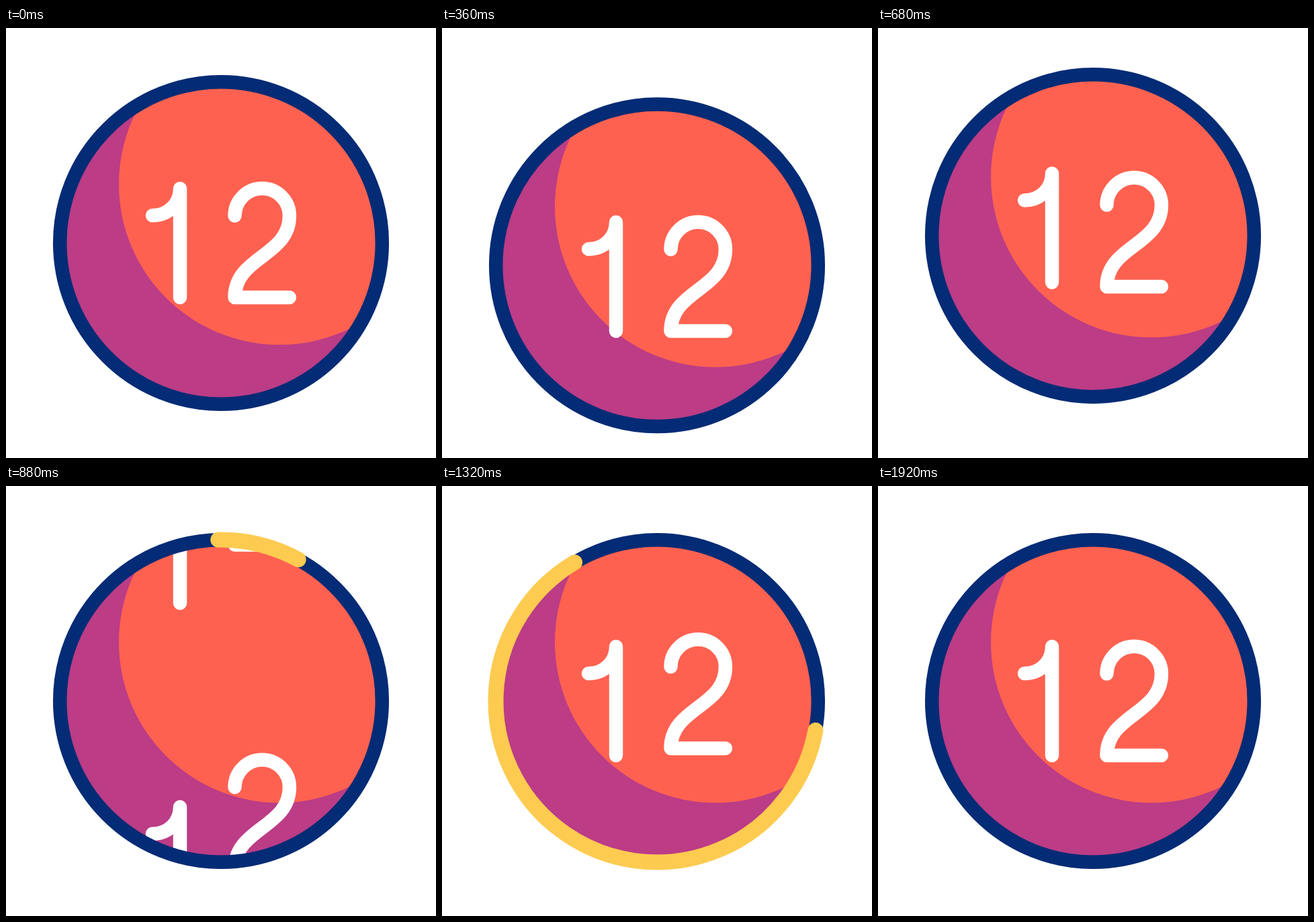
Write an HTML page that moves like this. It is 640x640 px and loops after 2 s.

```html
<!DOCTYPE html>
<html lang="en">
<head>
<meta charset="utf-8">
<title>Number ball</title>
<style>
  html, body { margin: 0; width: 100%; height: 100%; overflow: hidden; background: #fff; }
  svg { display: block; width: 100%; height: 100%; }
  .line { fill: none; stroke-linecap: round; stroke-linejoin: round; }
  .digit { stroke: #fff; stroke-width: 20.5; }
</style>
</head>
<body>
<svg viewBox="0 0 640 640">
  <defs>
    <clipPath id="inside"><circle cx="320" cy="320" r="238"/></clipPath>
    <path id="one" class="line digit" d="M259 401V239C259 262 241 279 218 279"/>
    <path id="two" class="line digit" d="M340.5 279.5a40.7 40.7 0 0 1 81.4 0C421.9 340 340.5 340 340.5 401H421.9"/>
  </defs>
  <g id="ball">
    <g clip-path="url(#inside)">
      <circle cx="320" cy="320" r="240" fill="#bc3c86"/>
      <circle cx="407" cy="232.5" r="239" fill="#ff6150"/>
      <use id="oldOne" href="#one"/>
      <use id="oldTwo" href="#two"/>
      <use id="newOne" href="#one"/>
      <use id="newTwo" href="#two"/>
    </g>
    <circle class="line" cx="320" cy="320" r="239.8" stroke="#042b75" stroke-width="20.5"/>
  </g>
  <path id="arc" class="line" stroke="#fdcb50" stroke-width="23"/>
</svg>
<script>
const LOOP = 2000, STEP = 40;
const $ = id => document.getElementById(id);

// Each track lists [time, value] keys, eased in and out between neighbours.
// Digits move relative to the ball that carries them.
const hop = [[120, 0], [360, 16.7], [560, -33]];
const shifts = {
  ball: [[120, 0], [360, 33.3], [560, -31], [760, 0]],
  oldOne: [...hop, [760, 0], [960, -350]],
  oldTwo: [...hop, [720, 0], [920, -350]],
  newOne: [[760, 313], [1160, -30.5], [1320, 0]],
  newTwo: [[720, 325], [1120, -119], [1365, 0]]
};
const head = [[760, 0], [1440, 360]];
const tail = [[1040, 0], [1840, 360]];

function valueAt(keys, t) {
  const next = keys.findIndex(key => key[0] > t);
  if (next < 0) return keys[keys.length - 1][1];
  if (next === 0) return keys[0][1];
  const [t0, v0] = keys[next - 1], [t1, v1] = keys[next];
  const p = (t - t0) / (t1 - t0);
  return v0 + (v1 - v0) * p * p * (3 - 2 * p);
}

function pointAt(degrees) {
  const a = (degrees - 1) * Math.PI / 180;
  return `${320 + 240 * Math.sin(a)} ${320 - 240 * Math.cos(a)}`;
}

function arcPath(from, to) {
  if (to <= from) return '';
  const curve = end => `A240 240 0 0 1 ${pointAt(end)}`;
  return `M${pointAt(from)}${curve((from + to) / 2)}${curve(to)}`;
}

function draw(now) {
  const t = Math.floor(now % LOOP / STEP) * STEP;
  for (const id in shifts) {
    $(id).setAttribute('transform', `translate(0 ${valueAt(shifts[id], t)})`);
  }
  $('arc').setAttribute('d', arcPath(valueAt(tail, t), valueAt(head, t)));
}

function tick() {
  draw(performance.now());
  requestAnimationFrame(tick);
}
tick();
</script>
</body>
</html>
```
